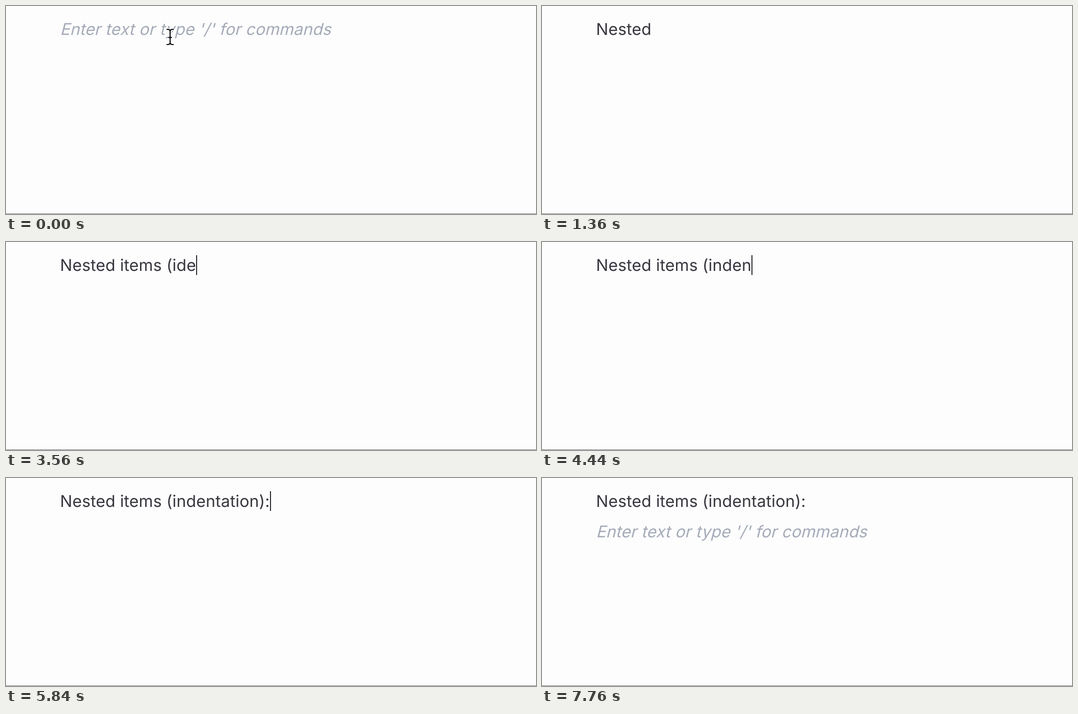
These frames come from a looping animation (1040x410 px, 8 s). An HTML page:

```html
<!DOCTYPE html>
<html lang="en">
<head>
<meta charset="utf-8">
<title>Typing in an editor</title>
<style>
  html, body { margin: 0; width: 100%; height: 100%; overflow: hidden; background: #fdfdfd; }
  svg { display: block; width: 1040px; height: 410px; }
  text {
    font: 400 32px Inter, sans-serif;
    font-optical-sizing: none;
    letter-spacing: 0.1px;
    text-rendering: geometricPrecision;
    white-space: pre;
    fill: #37373f;
  }
  #hint { fill: #a5abb8; }
  #caret { fill: #2b2b33; }
  #pointer path { fill: none; stroke-linejoin: round; }
</style>
</head>
<body>
<svg viewBox="0 0 1040 410">
  <rect width="1040" height="410" fill="#fdfdfd"/>
  <text id="line" x="106" y="57" xml:space="preserve"></text>
  <text id="hint">Enter text or type '/' for commands</text>
  <rect id="caret" width="2" height="39"/>
  <g id="pointer" transform="translate(322 61)">
    <path id="halo" stroke="#fdfdfd" stroke-width="5"/>
    <path id="beam" stroke="#000" stroke-width="2"/>
  </g>
  <rect y="409" width="1040" height="1" fill="#777"/>
</svg>
<script>
const LOOP = 8000, TICK = 40, BLINK = 500;
const LEFT = 106, TOP = 26, ROW = 60, BASE = 31, SLANT = -14;

// [time, key]; "<" deletes, "\n" opens the next row
const keys = [
  [40, "N"], [280, "e"], [400, "s"], [560, "t"], [720, "e"], [860, "d"],
  [1500, " "], [2520, "i"], [2600, "t"], [2680, "e"], [2760, "m"], [2920, "s"],
  [3040, " "], [3200, "("], [3440, "i"], [3520, "d"], [3560, "e"],
  [3760, "<"], [3840, "<"],
  [4000, "n"], [4120, "d"], [4280, "e"], [4440, "n"], [4560, "t"],
  [4640, "a"], [4720, "t"], [4800, "i"], [4960, "o"], [5160, "n"],
  [5440, ")"], [5720, ":"], [6230, "\n"]
];

const $ = id => document.getElementById(id);
const line = $("line"), hint = $("hint"), caret = $("caret"), pointer = $("pointer");
const show = (el, on) => el.setAttribute("visibility", on ? "visible" : "hidden");

const beam = "M-7 -15H-5Q0 -15 0 -11V11Q0 15 -5 15H-7M7 -15H5Q0 -15 0 -11M0 11Q0 15 5 15H7M-3.5 1H3.5";
$("halo").setAttribute("d", beam);
$("beam").setAttribute("d", beam);

function typed(t) {
  let text = "", last = -BLINK, row = 0;
  for (const [at, key] of keys) {
    if (at > t) break;
    last = at;
    if (key === "\n") row++;
    else text = key === "<" ? text.slice(0, -1) : text + key;
  }
  return { text, last, row };
}

function draw(ms) {
  // the picture refreshes 25 times a second
  const t = Math.floor((ms % LOOP + 0.5) / TICK) * TICK;
  const { text, last, row } = typed(t);
  const empty = row > 0 || !text;

  line.textContent = text;
  show(hint, empty);
  hint.setAttribute("transform", `translate(${LEFT} ${TOP + BASE + row * ROW}) skewX(${SLANT})`);

  const width = empty ? 0 : line.getComputedTextLength();
  caret.setAttribute("x", Math.round(LEFT + width));
  caret.setAttribute("y", TOP + row * ROW);
  show(caret, last >= 0 && (t - last) % (2 * BLINK) < BLINK);
  show(pointer, !text);
}

function loop() {
  draw(performance.now());
  requestAnimationFrame(loop);
}
loop();
</script>
</body>
</html>
```
